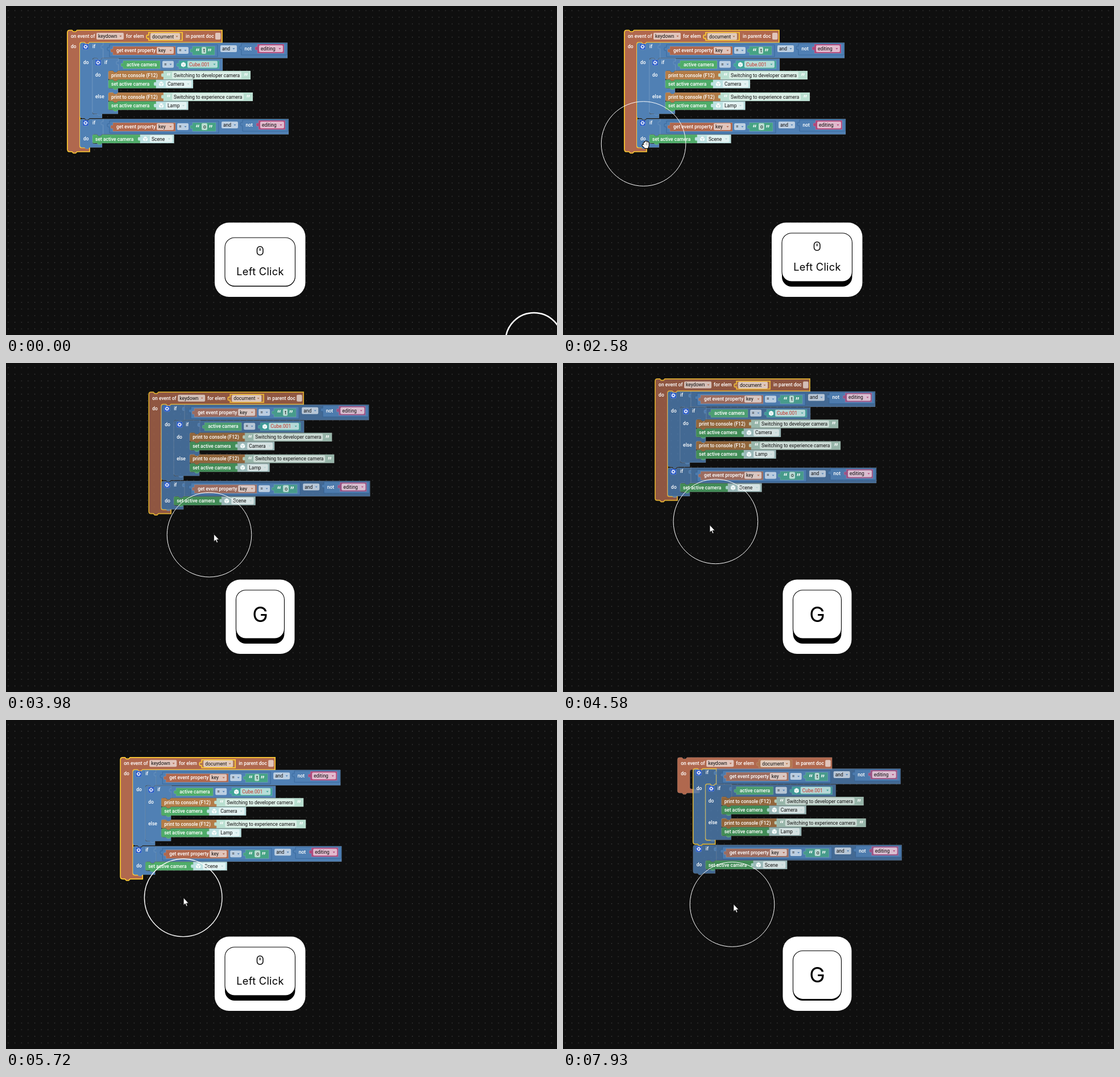
These frames come from a looping animation (969x578 px, 8 s). An HTML page:

```html
<!DOCTYPE html>
<html lang="en">
<head>
<meta charset="utf-8">
<title>Moving code blocks</title>
<style>
html, body { margin: 0; width: 100%; height: 100%; overflow: hidden; background: #0f0f0f; }
svg { display: block; }
text { font: 8.5px Roboto, sans-serif; fill: #111; white-space: pre; }
.label { font-weight: 500; fill: #fff; }
.quote { font-weight: 700; font-size: 18px; fill: #fff; fill-opacity: .85; text-anchor: middle; }
.key { font-family: Inter, sans-serif; fill: #000; text-anchor: middle; }
.block { stroke: #fff; stroke-opacity: .22; stroke-width: .6; }
.socket { stroke: #28568a; stroke-opacity: .8; stroke-width: .7; }
.selected { stroke: #fc3; stroke-opacity: 1; stroke-width: 1.7; }
.dragging .block, .dragging .socket { fill-opacity: .8; }
.dragging .selected { stroke-opacity: .8; }
</style>
</head>
<body>
<svg id="stage" width="969" height="578" viewBox="0 0 969 578"></svg>
<script>
const BLUE = '#5080b4', RUST = '#b0684e', GREEN = '#4fac69', BROWN = '#b27c48',
      MINT = '#46a384', TEAL = '#40a599', PINK = '#b0487b', TAN = '#b0764f',
      PALE_MINT = '#b9dfd0', PALE_TEAL = '#bce2e2';
const GRID = 11.65;

// Block parts, in stage pixels at the starting position
const label = (x, y, s) => `<text class="label" x="${x}" y="${y + 3}">${s}</text>`;
const shape = (d, fill, cls = 'block', id = '') => `<path id="${id}" class="${cls}" d="${d}" fill="${fill}"/>`;
const NOTCH = 'l2.5 2.5h4l2.5-2.5', NUB = 'l-2.5 2.5h-4l-2.5-2.5';

const value = (x, y, right, h, fill, cls, id) =>
  shape(`M${x} ${y}H${right}v${h}H${x}V${y + 11}c0-2.5-4 2-4-3.5s4-1 4-3.5z`, fill, cls, id);

const statement = (x, y, right, fill) =>
  shape(`M${x} ${y + 2}q0-2 2-2h6${NOTCH}H${right}v15H${x + 17}${NUB}H${x + 2}q-2 0-2-2z`, fill);

function chip(x, y, right, s, arrow = '#555', ink = '#111', opacity = .62) {
  return `<rect x="${x}" y="${y - 6}" width="${right - x}" height="12" rx="2" fill="#fff" fill-opacity="${opacity}"/>` +
    `<text x="${x + 3}" y="${y + 3}" style="fill:${ink}">${s}</text>` +
    (arrow ? `<path d="M${right - 7.5} ${y - 1}h4l-2 2.4z" fill="${arrow}"/>` : '');
}

const gear = (x, y) => `<g transform="translate(${x} ${y})" fill="none" stroke="#fff">
  <rect x="-5" y="-5" width="10" height="10" rx="2" fill="#1c4fc6" stroke="#7ea3e0" stroke-width=".5"/>
  <circle r="3" stroke-width="1.5" stroke-dasharray="1.2 1.156"/><circle r="2" stroke-width="1.1"/></g>`;

const cube = (x, y) => `<path transform="translate(${x} ${y})" d="M0-4.5L4-2.3V2.3L0 4.5L-4 2.3V-2.3z" fill="#fff"/>` +
  `<path transform="translate(${x} ${y})" d="M-4-2.3L0 0L4-2.3M0 0V4.5" fill="none" stroke="#8fc7c5" stroke-width=".7"/>`;

const quotes = (x1, x2, y) => `<text class="quote" x="${x1}" y="${y + 10.5}">“</text><text class="quote" x="${x2}" y="${y + 10.5}">”</text>`;

// mouths: pairs of [top, bottom] of the statement openings
function cBlock(x, y, right, mouthX, mouths, bottom, fill, id, bar) {
  let d = `M${x} ${y + 4}q0-4 4-4h4${NOTCH}H${right}`;
  for (const [top, end] of mouths)
    d += `V${top}H${mouthX + 17}${NUB}H${mouthX + 3}q-3 0-3 3V${end - 3}q0 3 3 3H${bar}`;
  return shape(`${d}V${bottom}H${x + 17}${NUB}H${x + 4}q-4 0-4-4z`, fill, 'block', id);
}

const hatShape = (bottom, id) => cBlock(108, 42.5, 380, 130, [[64, bottom - 7]], bottom, RUST, id, 147);

function condition(dy, letter, grow) {
  const y = 78 + dy, r = 2 * grow;
  return value(171, 64.5 + dy, 495 + r, 27, BLUE) +
    value(182, 68 + dy, 372 + r, 21, BLUE, 'socket') +
    value(188, 71 + dy, 298, 15, RUST) + label(194, y, 'get event property') + chip(265, y, 295, 'key', RUST) +
    chip(301, y, 321, '=', BLUE) +
    value(328, 71 + dy, 367 + r, 15, MINT) + quotes(337, 358 + r, y) + chip(344, y, 352 + r, letter, '') +
    chip(377 + r, y - 3, 406 + r, 'and', BLUE) +
    value(414 + r, 66 + dy, 494 + r, 20, BLUE, 'socket') + label(419.5 + r, y - 3, 'not') +
    value(442 + r, 67 + dy, 489 + r, 16, PINK) + chip(445 + r, y - 3, 487 + r, 'editing', PINK);
}

const print = (y, s, right) => statement(180, y - 7.5, 277, BROWN) + label(185, y, 'print to console (F12)') +
  value(277, y - 7.5, right, 15, PALE_MINT) + quotes(286, right - 8, y) + chip(292, y, right - 16, s, '', '#111', .5);

const setCamera = (x, y, s, right) => statement(x, y - 7.5, x + 84, GREEN) + label(x + 5, y, 'set active camera') +
  value(x + 84, y - 7.5, right, 15, PALE_TEAL) + cube(x + 93, y) + chip(x + 101, y, right - 3, s, '#b5d3d3', '#111', .6);

const stack =
  cBlock(130, 64.5, 171, 152, [[91.5, 190]], 197, BLUE, 'firstIf', 169) + gear(140, 71.5) + label(152, 71, 'if') + label(136, 99, 'do') +
  condition(0, 't', 0) +
  cBlock(152, 92, 198, 180, [[113.5, 145], [152, 183]], 189.5, BLUE, 'innerIf', 197) + gear(162, 99.5) + label(173, 99, 'if') +
  label(157, 121, 'do') + label(157, 159, 'else') +
  value(198, 92.5, 381, 21, BLUE) +
  value(206, 96, 271, 14, GREEN) + label(212, 102.5, 'active camera') + chip(275, 102.5, 295, '=', BLUE) +
  value(304, 96, 375, 14, TEAL) + cube(312, 103) + chip(319, 102.5, 372, 'Cube.001', TEAL, '#c8352a') +
  print(121.5, 'Switching to developer camera', 430) + setCamera(180, 137, 'Camera', 329) +
  print(159.5, 'Switching to experience camera', 434) + setCamera(180, 175, 'Lamp', 320.5) +
  cBlock(130, 198.5, 171, 152, [[225.5, 242]], 248.5, BLUE, 'secondIf', 169) + gear(140, 205.5) + label(152, 205, 'if') + label(136, 233, 'do') +
  condition(134, 'o', 1) + setCamera(152, 233.5, 'Scene', 295.5);

const blocks = `<g id="hat">${hatShape(256, 'hatFull')}${hatShape(105, 'hatEmpty')}
  ${label(114, 53, 'on event of')}${chip(159, 53, 207, 'keydown', RUST)}${label(211, 53, 'for elem')}
  ${value(251, 46.5, 310, 14, TAN, 'block', 'doc')}${chip(254, 53.5, 306, 'document', TAN)}
  ${label(316, 53, 'in parent doc')}${chip(368, 53, 377.5, '', '')}${label(114, 71, 'do')}
  <g id="stack">${stack}</g></g>`;

const card = (id, x, w, face) => `<g id="${id}">
  <rect x="${x - 18}" y="380.5" width="${w + 36}" height="130.5" rx="25" fill="#fff"/>
  <rect x="${x}" y="408" width="${w}" height="85" rx="17"/>
  <g class="cap"><rect x="${x}" y="399" width="${w}" height="85" rx="17" fill="#fff" stroke="#000" stroke-width="1.1"/>${face}</g></g>`;

const cards = card('clickCard', 385, 123.5,
    `<rect x="441.5" y="414.5" width="10.5" height="15" rx="5.2" fill="none" stroke="#000" stroke-width="1.5"/>
     <path d="M446.7 417.5v4.5" stroke="#000" stroke-width="1.5"/>
     <text class="key" x="447" y="464.5" style="font-size:18.2px;letter-spacing:.3px">Left Click</text>`) +
  card('gCard', 404.5, 85, '<text class="key" x="447" y="455" style="font-size:37px">G</text>');

const fingers = 'M-3.2-3V2M-1-5V2M1.4-5V2M3.7-3.5V2M-5.4 1L-2 4.5M-2 2H3.5L2.6 5H-1z';
const pointer = `<circle id="ring" fill="none" stroke="#fff"/>
  <path id="arrow" d="M0 0V13L3 10.2L5 15L7 14.1L5 9.6H9z" fill="#fff" stroke="#000" stroke-width=".7"/>
  <g id="hand" fill="#fff" stroke-linecap="round" stroke-linejoin="round">
    <path d="${fingers}" stroke="#000" stroke-width="4.2"/><path d="${fingers}" stroke="#fff" stroke-width="2"/></g>`;

// Blocks snap to the grid, so one dot lies at the corner of the first block
document.getElementById('stage').innerHTML = `<defs>
  <pattern id="grid" x="${108.2 % GRID}" y="${42.4 % GRID}" width="${GRID}" height="${GRID}" patternUnits="userSpaceOnUse">
  <rect width="1.2" height="1.2" fill="#4c4c4c"/></pattern></defs>
  <rect width="969" height="578" fill="#0f0f0f"/><rect width="969" height="578" fill="url(#grid)"/>${blocks}${cards}${pointer}`;

// Pointer route: time, x, y
const route = [
  [0, 928.5, 589], [70, 928.5, 589], [400, 480, 400], [700, 195, 305], [860, 118, 279], [920, 112.5, 270],
  [1050, 111.2, 262.5], [1320, 121.5, 231.5], [1990, 121.5, 231.5], [2250, 122.5, 232], [2580, 141.5, 242],
  [2780, 205, 271], [2850, 207, 284], [2980, 208, 293], [3120, 208, 293], [3350, 226, 297], [3920, 344, 302],
  [3980, 357.3, 301.7], [4180, 393, 287], [4380, 358, 265], [4580, 268.7, 278.3], [4650, 251, 294], [4720, 247, 328],
  [4780, 262, 325], [4980, 300, 314], [5180, 311.7, 312.3], [6200, 311.7, 312.3], [6450, 262, 240], [6750, 231, 205],
  [7060, 256, 218], [7660, 297, 322], [7870, 297, 322], [7930, 297.5, 324], [8000, 301, 323]];

function slope(i, c) {
  if (i < 1 || i > route.length - 2) return 0;
  const rate = j => (route[j + 1][c] - route[j][c]) / (route[j + 1][0] - route[j][0]);
  const a = rate(i - 1), b = rate(i);
  return a * b > 0 ? 2 * a * b / (a + b) : 0;
}

// Smooth interpolation without overshoot
function pointAt(t) {
  t = Math.min(t, 7999);
  const i = route.findIndex(p => p[0] > t) - 1, span = route[i + 1][0] - route[i][0], u = (t - route[i][0]) / span;
  return [1, 2].map(c => {
    const a = route[i][c], b = route[i + 1][c];
    return a + (b - a) * u * u * (3 - 2 * u) + span * u * (1 - u) * (slope(i, c) * (1 - u) - slope(i + 1, c) * u);
  });
}

// Presses: down, up, depth
const clicks = [[-200, 40, 1], [1985, 2085, .75], [5430, 5560, 1], [6990, 7090, .25]];
const keys = [[3100, 3250, 1], [7850, 8100, 1]];
const pressed = (t, list, release) => Math.max(...list.map(([down, up, depth]) => depth *
  (t < down ? 0 : t < up ? Math.min(1, (t - down) / 100) : Math.max(0, 1 - (t - up) / release) ** 2)));

const $ = id => document.getElementById(id);
const move = (el, x, y) => el.setAttribute('transform', `translate(${x} ${y})`);
const show = (id, on) => { $(id).style.display = on ? '' : 'none'; };
const caps = document.querySelectorAll('.cap');

function frame() {
  const t = performance.now() % 8000, [x, y] = pointAt(t), [px, py] = pointAt(t + 35);
  const dragHat = t >= 3115 && t < 5440, dragStack = t >= 7860, hatSelected = t < 7040;

  if (dragHat) move($('hat'), Math.max(0, x - 214.3), y - 293);
  else move($('hat'), t < 5440 ? 0 : 8 * GRID, t < 5440 ? 0 : 2 * GRID);
  move($('stack'), dragStack ? x - 292 : 0, dragStack ? y - 326.2 : 0);
  $('hat').classList.toggle('dragging', dragHat);
  $('stack').classList.toggle('dragging', dragStack);
  show('hatFull', !dragStack);
  show('hatEmpty', dragStack);
  for (const id of ['hatFull', 'doc']) $(id).classList.toggle('selected', hatSelected);
  $('firstIf').classList.toggle('selected', !hatSelected);

  const gKey = dragHat || dragStack;
  show('gCard', gKey);
  show('clickCard', !gKey);
  for (const cap of caps) move(cap, 0, 8 * pressed(t, gKey ? keys : clicks, 130));

  const squeeze = pressed(t, clicks, 320), ring = $('ring');
  move(ring, x, y);
  ring.setAttribute('r', 74.3 - 24.3 * squeeze);
  ring.setAttribute('stroke-width', 1 + 1.6 * squeeze);
  const overBlock = (t > 1200 && t < 2630) || (t > 6400 && t < 7250);
  show('hand', overBlock);
  show('arrow', !overBlock);
  move($('hand'), px - 3, py - 1);
  move($('arrow'), px + .5, py);
  requestAnimationFrame(frame);
}
frame();
</script>
</body>
</html>
```
